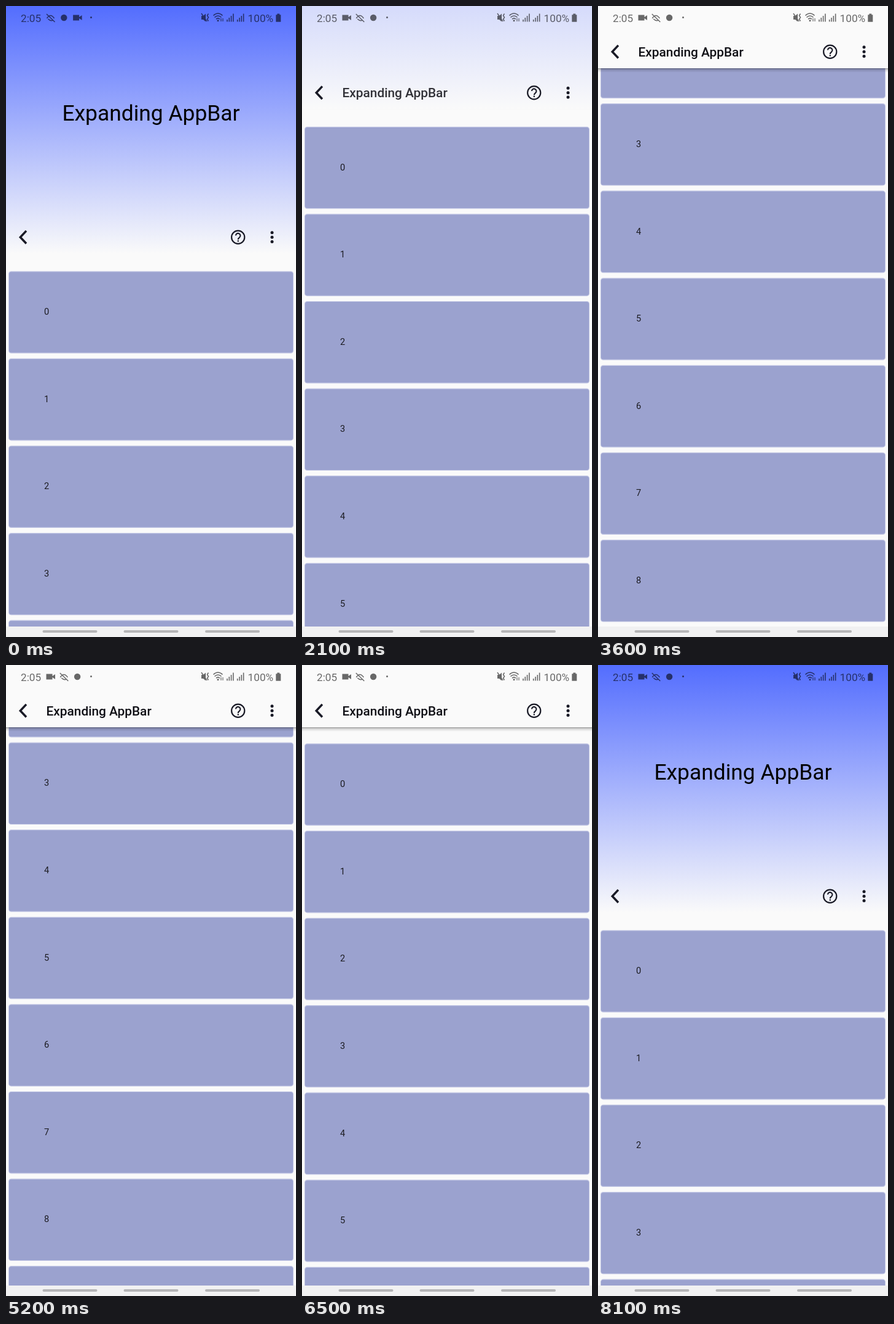
An HTML page that plays this animation: 472x1024 px, repeating every 8200 ms.

```html
<!DOCTYPE html>
<html lang="en">
<head>
<meta charset="utf-8">
<title>Expanding AppBar</title>
<style>
  html, body { margin: 0; width: 100%; height: 100%; overflow: hidden; background: #fafafa; }
  svg { display: block; width: 100%; height: 100%; font-family: Roboto, sans-serif; }
  .line { fill: none; stroke: currentColor; }
</style>
</head>
<body>
<svg viewBox="0 0 472 1024">
  <defs>
    <linearGradient id="sky" x2="0" y2="1">
      <stop stop-color="#536dfe"/>
      <stop offset="1" stop-color="#fafafa"/>
    </linearGradient>
    <linearGradient id="shade" x2="0" y2="1">
      <stop stop-color="#000" stop-opacity=".38"/>
      <stop offset=".4" stop-color="#000" stop-opacity=".13"/>
      <stop offset="1" stop-color="#000" stop-opacity="0"/>
    </linearGradient>
  </defs>

  <rect width="472" height="1024" fill="#fafafa"/>
  <g id="list" font-size="14.6" text-anchor="middle"></g>

  <rect id="shadow" y="101" width="472" height="7" fill="url(#shade)"/>
  <rect id="bar" width="472" fill="#fafafa"/>
  <rect id="tint" width="472" fill="url(#sky)"/>
  <text id="bigTitle" x="236" font-size="35.4" text-anchor="middle">Expanding AppBar</text>

  <!-- toolbar, drawn around y = 0 -->
  <g id="toolbar" fill="#191a26" color="#191a26">
    <path class="line" d="M33 -10.3 L23.3 0 L33 10.3" stroke-width="3.5"/>
    <text id="smallTitle" x="65.5" y="7.4" font-size="20.85" font-weight="500" fill="#101016">Expanding AppBar</text>
    <circle class="line" cx="377.7" r="10.6" stroke-width="2.2"/>
    <path class="line" d="M374 -2.6 a3.7 3.7 0 1 1 6.2 2.7 q-2.4 1.8 -2.4 3.6" stroke-width="2.1"/>
    <rect x="376.7" y="5" width="2.2" height="2.3"/>
    <circle cx="433" cy="-7.4" r="2.5"/>
    <circle cx="433" r="2.5"/>
    <circle cx="433" cy="7.4" r="2.5"/>
  </g>

  <!-- status bar -->
  <g opacity=".58" font-size="17.2">
    <text x="24" y="25.7">2:05</text>
    <g id="eye"><path class="line" d="M-6 1 Q0 -8 6 1 M-4 2 Q0 6 4 4 M-6.5 -6 L7 7" stroke-width="1.5"/></g>
    <circle id="badge" r="5.2"/>
    <g id="camera"><path d="M-7 -4.5 H3 V-1 L7.5 -4 V4 L3 1 V4.5 H-7 Z"/></g>
    <circle cx="138.5" cy="18.5" r="1.5"/>

    <path d="M318 16 h3 l4 -3.5 v13 l-4 -3.5 h-3 z"/>
    <path class="line" d="M318 12 L327 25 M329.5 12.5 l-2 3 l2 3 l-2 3 l2 3" stroke-width="1.5"/>
    <path class="line" d="M337.5 15.5 Q345 8.5 352.5 15.5 M339.5 18.5 Q345 13.5 350.5 18.5 M342 21.3 Q345 18.5 348 21.3" stroke-width="1.6"/>
    <circle cx="345" cy="23.8" r="1.5"/>
    <path class="line" d="M350 20 v5 M353 20 v5" stroke-width="1.2"/>
    <path id="bars" class="line" d="M360 22 v3.5 M363.3 19 v6.5 M366.6 16 v9.5 M369.9 12.5 v13" stroke-width="1.6"/>
    <use href="#bars" x="16.7"/>
    <text x="393.6" y="25.7">100%</text>
    <path d="M439.3 14.2 h2 v-1.7 h4 v1.7 h2 v11.5 h-8 z"/>
  </g>

  <!-- navigation hints -->
  <rect y="1007" width="472" height="17" fill="#f1f1f2"/>
  <g fill="#b5b5b7">
    <rect x="59.5" y="1013" width="89" height="4" rx="2"/>
    <rect x="191.5" y="1013" width="89" height="4" rx="2"/>
    <rect x="324" y="1013" width="89" height="4" rx="2"/>
  </g>
</svg>
<script>
const LOOP = 8200, STEP = 100;
const BAR_HEIGHT = 402, COLLAPSE = 301, FIRST_CARD = 430.8, PITCH = 141.6;

// [time in ms, scroll offset in px]
const scrollKeys = [
  [0, 0], [950, 0], [2100, 234.5], [2700, 322], [3600, 697], [4400, 835], [4700, 835],
  [5200, 729.5], [5900, 451.5], [6500, 303], [7100, 206], [7700, 0], [LOOP, 0]
];

const el = id => document.getElementById(id);
const set = (id, attrs) => {
  for (const name in attrs) el(id).setAttribute(name, attrs[name]);
};
const clamp = v => Math.max(0, Math.min(1, v));

el("list").innerHTML = Array.from({ length: 10 }, (_, i) => `
  <g transform="translate(0 ${FIRST_CARD + i * PITCH})">
    <rect x="4" y="-.6" width="464" height="133.6" rx="4.5" fill="#c6cae6"/>
    <rect x="5" y=".6" width="462" height="131.2" rx="3.5" fill="#9ba2cf"/>
    <text x="66" y="70.4" fill="#1c1c22">${i}</text>
  </g>`).join("");

const slope = i => (scrollKeys[i + 1][1] - scrollKeys[i][1]) / (scrollKeys[i + 1][0] - scrollKeys[i][0]);

// Harmonic mean of neighbouring slopes keeps the curve free of overshoot.
function tangent(i) {
  if (i === 0 || i === scrollKeys.length - 1) return 0;
  const a = slope(i - 1), b = slope(i);
  return a * b > 0 ? 2 * a * b / (a + b) : 0;
}

function scrollAt(time) {
  const i = scrollKeys.findIndex((key, n) => n + 1 < scrollKeys.length && time < scrollKeys[n + 1][0]);
  const [t0, y0] = scrollKeys[i], [t1, y1] = scrollKeys[i + 1];
  const span = t1 - t0, u = (time - t0) / span, v = 1 - u;
  return y0 * v * v * (1 + 2 * u) + y1 * u * u * (3 - 2 * u)
    + span * u * v * (tangent(i) * v - tangent(i + 1) * u);
}

function placeStatusIcons(order) {
  order.forEach((id, i) => set(id, { transform: `translate(${72.5 + i * 21.8} 19)` }));
}

function draw(time) {
  const scroll = scrollAt(time);
  const shrink = Math.min(scroll, COLLAPSE);
  const height = BAR_HEIGHT - shrink;
  set("list", { transform: `translate(0 ${-scroll})` });
  set("bar", { height });
  set("tint", { height, opacity: 1 - shrink / COLLAPSE });
  set("shadow", { opacity: scroll >= COLLAPSE ? 1 : 0 });
  set("toolbar", { transform: `translate(0 ${375.2 - shrink})` });
  set("bigTitle", { y: 185.5 - shrink / 2, opacity: clamp(1 - shrink / 150) });
  set("smallTitle", { opacity: clamp((shrink - 165) / 82) });
  placeStatusIcons(time < 500 ? ["eye", "badge", "camera"] : ["camera", "eye", "badge"]);
}

const start = performance.now();
function tick() {
  const time = (performance.now() - start) % LOOP;
  draw(Math.floor(time / STEP) * STEP);
  requestAnimationFrame(tick);
}
tick();
</script>
</body>
</html>
```
